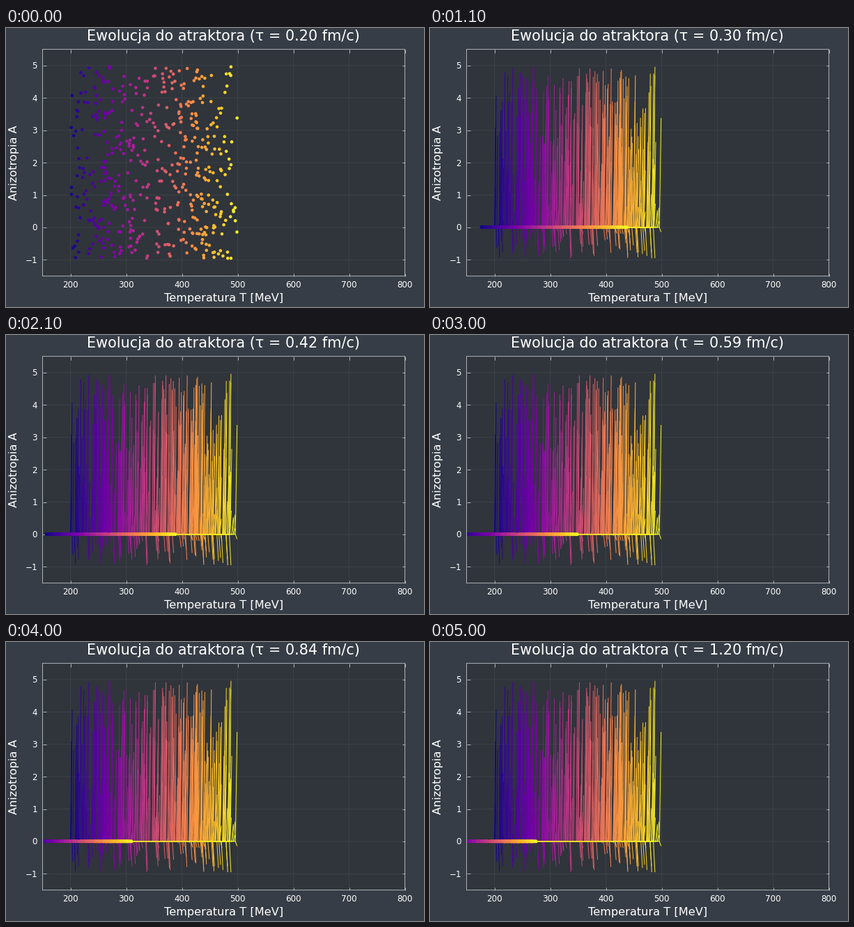
A matplotlib script that plays this animation: 600x400 px, repeating every 5.05 s.

```python
import numpy as np
import matplotlib.pyplot as plt
from matplotlib.animation import FuncAnimation
from matplotlib.collections import LineCollection

W, H, DPI = 600, 400, 100
FRAMES, STEP_MS = 101, 50
BACK, INNER, FG = "#363d46", "#30343b", "#adb2b7"
PX = 72 / DPI  # one pixel in points
LEFT, TOP, WIDTH, HEIGHT = 52.5, 30.6, 520, 325
T_MIN, T_MAX, A_MIN, A_MAX = 150, 800, -1.5, 5.5
TAU0, TAU1 = 0.2, 1.2
C_TAU = (2 - np.log(2)) / (2 * np.pi)
C_ETA = 1 / (4 * np.pi)

plt.rcParams["font.family"] = "DejaVu Sans"


def start_states(n=480):
    """Random (T, A) cloud, a little denser near 275 and 425 MeV."""
    rng = np.random.default_rng(7)
    u = rng.random(n)
    temp = 200 + 300 * (u + 0.02 * np.sin(4 * np.pi * u))
    cloud = np.column_stack([temp, rng.uniform(-0.97, 4.97, n)])
    corners = [(203, 4.07), (209, -0.93), (488, -0.95), (488, 4.96), (499, 3.38)]
    inside = (cloud[:, 0] > 208) & (cloud[:, 0] < 492) | (cloud[:, 1] < 3.4)
    return np.vstack([cloud[inside], corners])


def evolve(t0, a0, tau):
    """Bjorken cooling and relaxation of the anisotropy to the attractor."""
    temp = t0 * (tau / TAU0) ** (-1 / 3)
    depth = 1.5 * t0 * TAU0 ** (1 / 3) * (tau ** (2 / 3) - TAU0 ** (2 / 3)) / C_TAU
    limit = 8 * C_ETA / (tau * temp)
    return temp, limit + (a0 - limit) * np.exp(-depth)


start = start_states()
tau = TAU0 * (TAU1 / TAU0) ** (np.arange(FRAMES) / (FRAMES - 1))
temp, aniso = evolve(start[:, :1], start[:, 1:], tau[None, :])
paths = np.stack([temp, aniso], axis=2)  # particle, step, (T, A)
colors = plt.get_cmap("plasma")((start[:, 0] - 200) / 300)

fig = plt.figure(figsize=(W / DPI, H / DPI), dpi=DPI, facecolor=BACK)
ax = fig.add_axes([LEFT / W, 1 - (TOP + HEIGHT) / H, WIDTH / W, HEIGHT / H],
                  facecolor=INNER)
ax.set_xlim(T_MIN, T_MAX)
ax.set_ylim(A_MIN, A_MAX)
ax.set_xticks(range(200, 801, 100))
ax.set_yticks(range(-1, 6))
ax.set_axisbelow(True)
ax.grid(color=FG, alpha=0.1, lw=PX, snap=False)
ax.tick_params(direction="in", top=True, right=True, length=4.5 * PX, width=PX,
               color=FG, labelbottom=False, labelleft=False)
for spine in ax.spines.values():
    spine.set(color=FG, linewidth=PX, snap=False)


def label(x, y, text, px, ha="center", **kw):
    return fig.text(x / W, 1 - y / H, text, color="white", fontsize=px * PX,
                    ha=ha, va="baseline", rotation_mode="anchor", **kw)


for t in range(200, 801, 100):
    label(LEFT + (t - T_MIN) * WIDTH / (T_MAX - T_MIN), 371.5, str(t), 11.9)
for a in range(-1, 6):
    y = TOP + (A_MAX - a) * HEIGHT / (A_MAX - A_MIN)
    label(45, y + 4.5, str(a).replace("-", "\u2212"), 11.9, ha="right")
label(312.5, 392, "Temperatura T [MeV]", 16.1)
label(16.5, 193.3, "Anizotropia A", 16.1, rotation=90)
title = label(312.3, 18.4, "", 20.8)

trails = LineCollection([], colors=colors, linewidths=PX, zorder=2)
ax.add_collection(trails, autolim=False)
dots = ax.scatter(start[:, 0], start[:, 1], s=(4.6 * PX) ** 2, c=colors,
                  linewidths=0, zorder=3)


def update(i):
    title.set_text(f"Ewolucja do atraktora (τ = {tau[i]:.2f} fm/c)")
    trails.set_segments(paths[:, :i + 1] if i else [])
    dots.set_offsets(paths[:, i])
    return title, trails, dots


anim = FuncAnimation(fig, update, frames=FRAMES, interval=STEP_MS,
                     repeat=True, repeat_delay=0, blit=False)
plt.show()
```
